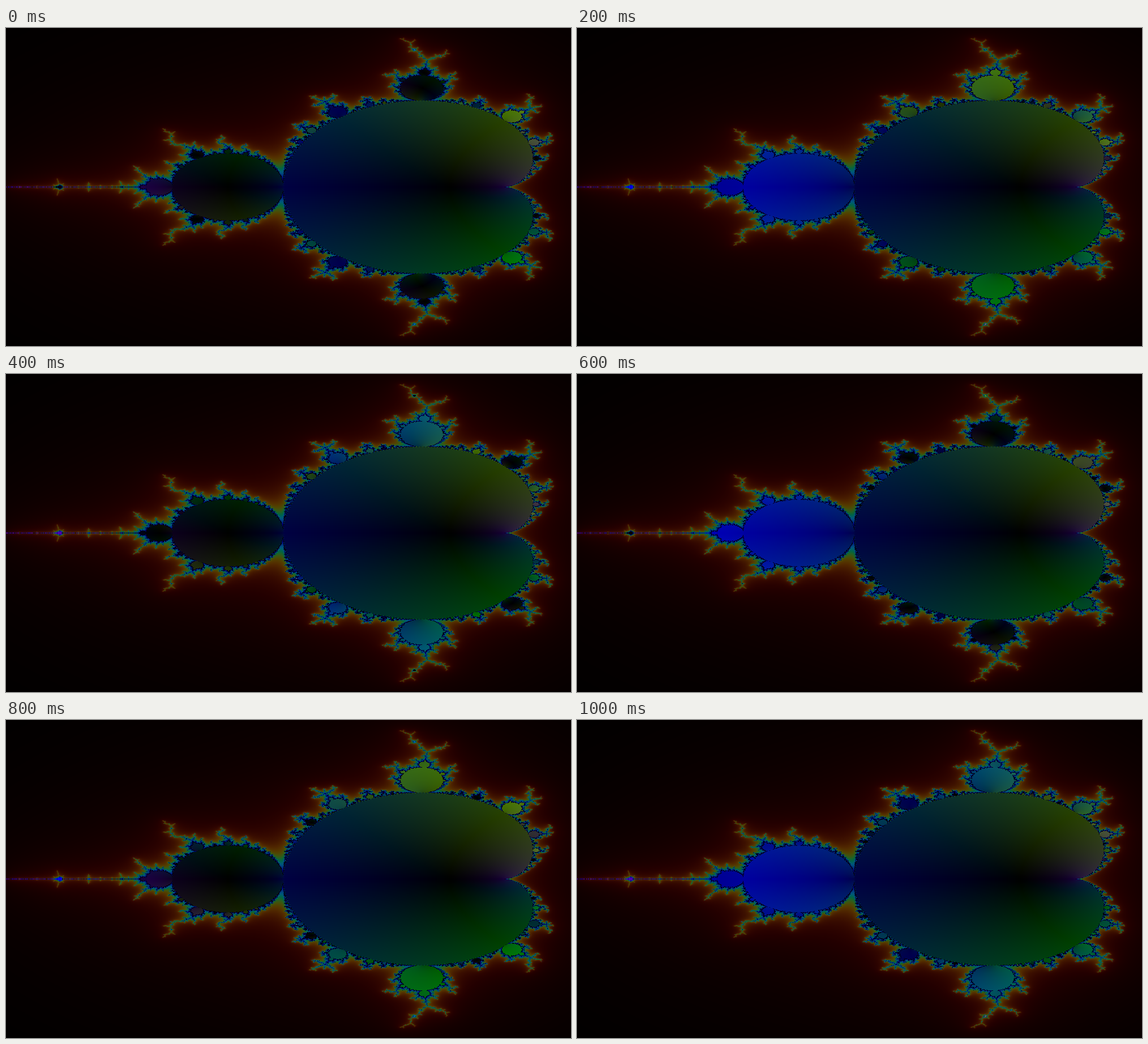
Recreate the animation shown at these times as an HTML page with a canvas. Size 998 by 561 pixels, loop 1200 ms.

```html
<!DOCTYPE html>
<html lang="en">
<head>
<meta charset="utf-8">
<title>Mandelbrot orbits</title>
<style>
  html, body { margin: 0; width: 100%; height: 100%; overflow: hidden; background: #000; }
  canvas { display: block; width: 998px; height: 561px; }
</style>
</head>
<body>
<canvas id="view" width="998" height="561"></canvas>
<script>
const W = 998, H = 561, ROWS = 560;
const STEP = 200, FRAMES = 6, DEPTH = 402, FAR = 1e4;
const LEFT = -2, SCALE_X = 391.5, SCALE_Y = 234.3, AXIS = 280;

const ctx = document.getElementById('view').getContext('2d');
const images = Array.from({ length: FRAMES }, () => ctx.createImageData(W, H));

function put(img, at, r, g, b) {
  img.data[at] = r;
  img.data[at + 1] = g;
  img.data[at + 2] = b;
  img.data[at + 3] = 255;
}

// Smooth step from 0 at a to 1 at b
function ramp(v, a, b) {
  const t = Math.min(1, Math.max(0, (v - a) / (b - a)));
  return t * t * (3 - 2 * t);
}

// Black, red, orange, teal, blue, then black again towards the rim
function outside(v) {
  return [
    7.5 * (v - 0.8) * (1 - ramp(v, 11, 22)),
    100 * ramp(v, 5, 20) * (1 - ramp(v, 20, 48)),
    125 * ramp(v, 13, 28) * (1 - ramp(v, 30, 100))
  ];
}

// Colour by where the orbit is now
function inside(x, y) {
  return [78 * y + 55 * x, 130 * Math.abs(y), 132 * Math.abs(x)];
}

function plot(px, py) {
  const cx = LEFT + px / SCALE_X, cy = (AXIS - py) / SCALE_Y;
  const at = (py * W + px) * 4;
  let x = 0, y = 0, n = 0;

  const size = () => x * x + y * y;
  function iterate() {
    const t = x * x - y * y + cx;
    y = 2 * x * y + cy;
    x = t;
    n++;
  }

  while (n < DEPTH && size() < FAR) iterate();
  if (size() >= FAR) {
    const color = outside(n - Math.log2(Math.log2(size()) / 2));
    for (const img of images) put(img, at, ...color);
    return;
  }
  for (const img of images) {
    put(img, at, ...inside(x, y));
    if (size() < FAR) iterate();
  }
}

for (let py = 0; py < ROWS; py++)
  for (let px = 0; px < W; px++) plot(px, py);

let shown = -1;
function draw() {
  const f = Math.floor(performance.now() / STEP) % FRAMES;
  if (f !== shown) ctx.putImageData(images[f], 0, 0);
  shown = f;
  requestAnimationFrame(draw);
}
draw();
</script>
</body>
</html>
```
